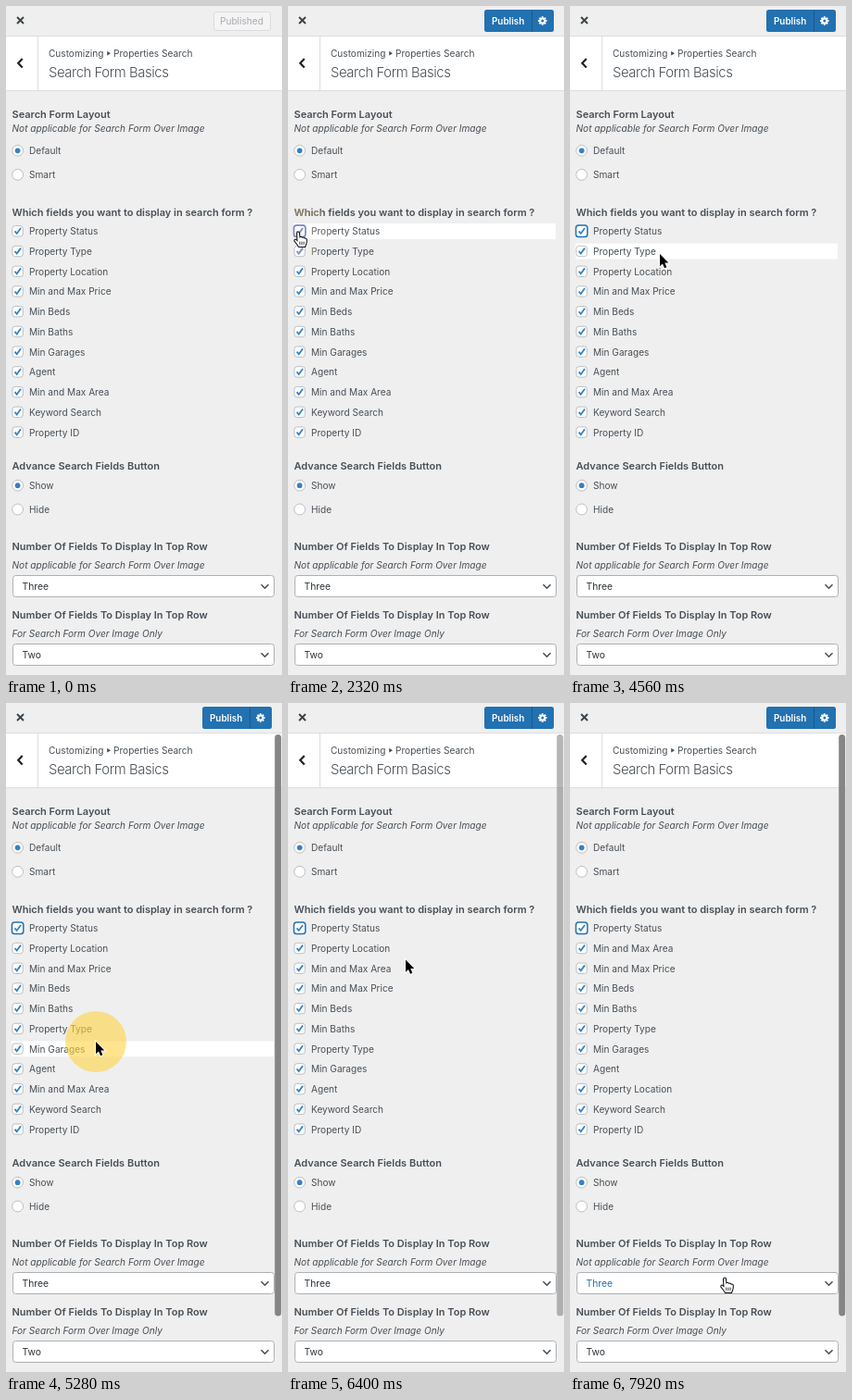
An HTML page with a canvas that plays this animation: 298x723 px, repeating every 8000 ms.

```html
<!DOCTYPE html>
<html lang="en">
<head>
<meta charset="utf-8">
<title>Search form settings</title>
<style>
html, body { margin: 0; width: 100%; height: 100%; overflow: hidden; background: #efefef; }
canvas { display: block; width: 298px; height: 723px; }
</style>
</head>
<body>
<canvas id="stage"></canvas>
<script>
const W = 298, H = 723, LOOP = 8000, STEP = 80;
const canvas = document.getElementById('stage');
const ctx = canvas.getContext('2d');
const dpr = window.devicePixelRatio || 1;
canvas.width = W * dpr;
canvas.height = H * dpr;

const BG = '#efefef', INK = '#484f56', BLUE = '#2271b1', TICK = '#3582c4', EDGE = '#adb0b4';
const FAMILY = 'Inter, Roboto, sans-serif';
const BODY = '10.1px ' + FAMILY;
const HEAD = '600 11px ' + FAMILY;
const NOTE = 'italic 10.1px ' + FAMILY;

const ROW_TOP = 243.3, PITCH = 21.73;
const rowY = i => ROW_TOP + i * PITCH;
const FIELDS = ['Property Status', 'Property Type', 'Property Location', 'Min and Max Price',
  'Min Beds', 'Min Baths', 'Min Garages', 'Agent', 'Min and Max Area', 'Keyword Search', 'Property ID'];

// Pointer tip: time, x, y
const PATH = [
  [320, 208, 247], [480, 124, 179], [560, 124, 179], [880, 48, 181], [1120, 48, 181],
  [1200, 48, 160], [1280, 48, 160], [1360, 48, 159], [1760, 48, 159], [1920, 53, 240],
  [2000, 53, 240], [2160, 11, 243], [2480, 11, 243], [2640, 13, 265], [2800, 13, 265],
  [2880, 14, 287], [3120, 14, 287], [3600, 15, 265], [3920, 15, 265], [4080, 13, 244],
  [4320, 13, 244], [4560, 97, 268], [4640, 97, 268], [5200, 97, 366], [5280, 97, 366],
  [5440, 127, 412], [5520, 127, 412], [6080, 127, 277.5], [6400, 127, 277.5],
  [6640, 110, 266], [6800, 110, 266], [7360, 100, 416], [7600, 120, 562], [7920, 167, 620]
];

// Time spans in which the button is held
const PRESSES = [[1040, 1200], [1600, 1760], [2320, 2560], [2640, 2800], [2880, 3120],
  [3760, 3920], [4160, 4320], [4640, 5360], [5520, 6160], [6800, 7440]];

const DRAGS = [
  { from: 4640, to: 5200, name: 'Property Type', slot: 5 },
  { from: 5520, to: 6080, name: 'Min and Max Area', slot: 2 },
  { from: 6800, to: 7360, name: 'Property Location', slot: 8 }
];

const OFF = {
  'Property Status': [2400, 4240],
  'Property Type': [2720, 3840],
  'Property Location': [2960, 3120]
};

// Start time and the control that takes the focus
const FOCUS = [[0, ''], [1040, 'Smart'], [1680, 'Default'], [2320, 'Property Status'],
  [2720, 'Property Type'], [2960, 'Property Location'], [3840, 'Property Type'], [4240, 'Property Status']];

const within = (t, [a, b]) => t >= a && t < b;
const focusAt = t => FOCUS.filter(f => f[0] <= t).pop()[1];

function pointerAt(t) {
  const next = PATH.findIndex(p => p[0] > t);
  if (next === 0) return null;
  if (next < 0) return PATH[PATH.length - 1].slice(1);
  const a = PATH[next - 1], b = PATH[next];
  const k = (t - a[0]) / (b[0] - a[0]);
  const e = k * k * (3 - 2 * k);
  return [a[1] + (b[1] - a[1]) * e, a[2] + (b[2] - a[2]) * e];
}

function listAt(t) {
  let order = FIELDS.slice(), held = null;
  for (const d of DRAGS) {
    if (t < d.from) break;
    const start = order.indexOf(d.name);
    let slot = d.slot;
    if (t < d.to) {
      const y = rowY(start) + pointerAt(t)[1] - pointerAt(d.from)[1];
      slot = Math.max(0, Math.min(10, Math.round((y - ROW_TOP) / PITCH)));
      held = { name: d.name, y };
    }
    order = order.filter(n => n !== d.name);
    order.splice(slot, 0, d.name);
  }
  return { order, held };
}

function text(str, x, mid, font = BODY, color = INK, spacing = 0) {
  ctx.font = font;
  ctx.letterSpacing = spacing + 'px';
  ctx.fillStyle = color;
  ctx.fillText(str, x, mid + 3.7);
}

function box(x, y, w, h, r, fill, stroke, line = 1) {
  ctx.beginPath();
  ctx.roundRect(x, y, w, h, r);
  if (fill) { ctx.fillStyle = fill; ctx.fill(); }
  if (stroke) { ctx.strokeStyle = stroke; ctx.lineWidth = line; ctx.stroke(); }
}

function disc(x, y, r, fill) {
  ctx.beginPath();
  ctx.arc(x, y, r, 0, Math.PI * 2);
  ctx.fillStyle = fill;
  ctx.fill();
}

function line(points, color, width) {
  ctx.beginPath();
  points.forEach(([x, y]) => ctx.lineTo(x, y));
  ctx.strokeStyle = color;
  ctx.lineWidth = width;
  ctx.stroke();
}

function radio(label, y, on, focused) {
  const r = focused ? 6.6 : 5.9;
  box(12.6 - r, y - r, 2 * r, 2 * r, r, '#fff', focused ? BLUE : EDGE, focused ? 1.6 : 0.8);
  if (on) disc(12.6, y, 2.9, TICK);
  text(label, 25, y);
}

function fieldRow(name, y, on, focused, lit, selected) {
  if (lit) { ctx.fillStyle = '#fff'; ctx.fillRect(6, y - 8.3, 283, 16.8); }
  if (selected) { ctx.fillStyle = '#9fcbfa'; ctx.fillRect(23, y - 7, 43, 14); }
  const r = focused ? 6.2 : 5.7;
  box(12.6 - r, y - r, 2 * r, 2 * r, 2.8, '#fff', focused ? BLUE : EDGE, focused ? 1.5 : 0.8);
  if (on) line([[9.5, y], [11.7, y + 2.6], [16, y - 3.4]], TICK, 1.8);
  text(name, 25, y + 0.3);
}

function dropdown(value, y, hover) {
  box(7.5, y - 11.7, 282, 23, 3, '#fff', EDGE, 1);
  text(value, 17.5, y, '10.3px ' + FAMILY, hover ? BLUE : '#2c3338');
  line([[275.5, y - 2], [279.5, y + 2], [283.5, y - 2]], INK, 1.6);
}

function gear(x, y) {
  ctx.save();
  ctx.translate(x, y);
  ctx.fillStyle = '#fff';
  for (let i = 0; i < 8; i++) {
    ctx.rotate(Math.PI / 4);
    ctx.fillRect(-1, -4.7, 2, 3);
  }
  ctx.restore();
  disc(x, y, 3.5, '#fff');
  disc(x, y, 1.5, BLUE);
}

function header(changed) {
  line([[12, 12], [19, 19]], '#3c434a', 1.9);
  line([[19, 12], [12, 19]], '#3c434a', 1.9);
  if (changed) {
    box(212, 4, 75, 24, 2.5, BLUE);
    text('Publish', 220, 16, '600 9.9px ' + FAMILY, '#fff');
    ctx.fillStyle = '#195a90';
    ctx.fillRect(263, 4, 1, 24);
    gear(274.8, 16);
  } else {
    box(224.5, 6.5, 61, 20, 2.5, '#f4f4f5', '#dcdcde', 1);
    text('Published', 231, 16, BODY, '#a7aaad');
  }
  ctx.fillStyle = '#ddd';
  ctx.fillRect(0, 32, W, 60);
  ctx.fillStyle = '#fff';
  ctx.fillRect(0, 33, 34, 58);
  ctx.fillRect(35, 33, W - 35, 58);
  line([[17.7, 57], [13.2, 61.7], [17.7, 66.4]], '#1d2327', 2.2);
  text('Customizing', 46, 51);
  ctx.beginPath();
  ctx.moveTo(109.2, 48.8);
  ctx.lineTo(113, 51.2);
  ctx.lineTo(109.2, 53.6);
  ctx.fillStyle = INK;
  ctx.fill();
  text('Properties Search', 116, 51);
  text('Search Form Basics', 46, 73, '300 14.8px ' + FAMILY, INK, -0.4);
}

function scrollbar(t) {
  let a = 0;
  if (within(t, [4800, 6320]) || t >= 6880) a = 1;
  else if (within(t, [6320, 6640])) a = 1 - (t - 6240) / 400;
  if (!a) return;
  ctx.globalAlpha = a;
  box(290.2, 34, 7, 628.5, 3.5, '#858585');
  ctx.globalAlpha = 1;
}

function halo(t, x, y) {
  const press = PRESSES.find(p => within(t, p));
  if (!press) return;
  ctx.save();
  // The first step only tints dark ink
  const faint = t - press[0] < STEP;
  if (faint) ctx.globalCompositeOperation = 'lighten';
  disc(x, y, 33, faint ? '#8f8648' : 'rgba(253,214,72,0.62)');
  ctx.restore();
}

const ARROW = new Path2D('M0 0V13.2L3 10.4L5 15.3L7.4 14.3L5.3 9.6H9.4Z');
const HAND = new Path2D('M-1.7 1.6Q0-1 1.6 1.4L2.1 6.6Q3.9 5.2 5 7.2Q7 6.2 8 8.2' +
  'Q10.3 7.6 10.4 10.2L10 14L8.4 18.6H.6L-1 16L-4.6 11.4Q-5 9-2.8 9.3L-1.2 10.8Z');
const KNUCKLES = new Path2D('M2 12V15.6M4.4 12V15.6M6.8 12V15.6');

function pointer(x, y, hand) {
  ctx.save();
  ctx.translate(x, y);
  if (hand) {
    ctx.translate(0, 0.8);
    ctx.scale(0.9, 0.9);
    ctx.fillStyle = '#fff';
    ctx.strokeStyle = '#111';
    ctx.lineWidth = 1.2;
    ctx.fill(HAND);
    ctx.stroke(HAND);
    ctx.lineWidth = 0.9;
    ctx.stroke(KNUCKLES);
  } else {
    ctx.strokeStyle = '#fff';
    ctx.lineWidth = 1.8;
    ctx.stroke(ARROW);
    ctx.fillStyle = '#000';
    ctx.fill(ARROW);
  }
  ctx.restore();
}

function fields(t, tip, focus) {
  const { order, held } = listAt(t);
  const isOn = name => !(OFF[name] && within(t, OFF[name]));
  order.forEach((name, i) => {
    if (held && held.name === name) return;
    const y = rowY(i);
    const lit = !held && tip && t >= 1920 && Math.abs(tip[1] - y) < 8.6;
    const selected = name === 'Property Location' && within(t, [3120, 3840]);
    fieldRow(name, y, isOn(name), focus === name, lit, selected);
  });
  if (held) fieldRow(held.name, held.y, true, false, true, false);
}

function draw(t) {
  const tip = pointerAt(t), focus = focusAt(t);
  const smart = within(t, [1040, 1680]);
  const onSelect = tip && tip[1] > 614;

  ctx.setTransform(dpr, 0, 0, dpr, 0, 0);
  ctx.fillStyle = BG;
  ctx.fillRect(0, 0, W, H);
  header(t >= 1040);

  text('Search Form Layout', 6.5, 117, HEAD);
  text('Not applicable for Search Form Over Image', 6.5, 132.5, NOTE);
  radio('Default', 156.3, !smart, focus === 'Default');
  radio('Smart', 182.3, smart, focus === 'Smart');

  text('Which fields you want to display in search form ?', 6.5, 222.8, HEAD);
  fields(t, tip, focus);

  text('Advance Search Fields Button', 6.5, 496.8, HEAD);
  radio('Show', 518.2, true, false);
  radio('Hide', 544, false, false);

  text('Number Of Fields To Display In Top Row', 6.5, 584, HEAD);
  text('Not applicable for Search Form Over Image', 6.5, 604, NOTE);
  dropdown('Three', 627.2, onSelect);
  text('Number Of Fields To Display In Top Row', 6.5, 658, HEAD);
  text('For Search Form Over Image Only', 6.5, 678, NOTE);
  dropdown('Two', 701.2, false);

  scrollbar(t);
  if (tip) {
    const [x, y] = tip;
    const hand = onSelect || (y > 235 && x < 22) || (y > 150 && y < 192 && x < 60);
    halo(t, x, y);
    pointer(x, y, hand);
  }
}

const began = performance.now();
function tick() {
  const t = (performance.now() - began) % LOOP;
  draw(Math.floor(t / STEP) * STEP);
  requestAnimationFrame(tick);
}
tick();
</script>
</body>
</html>
```
